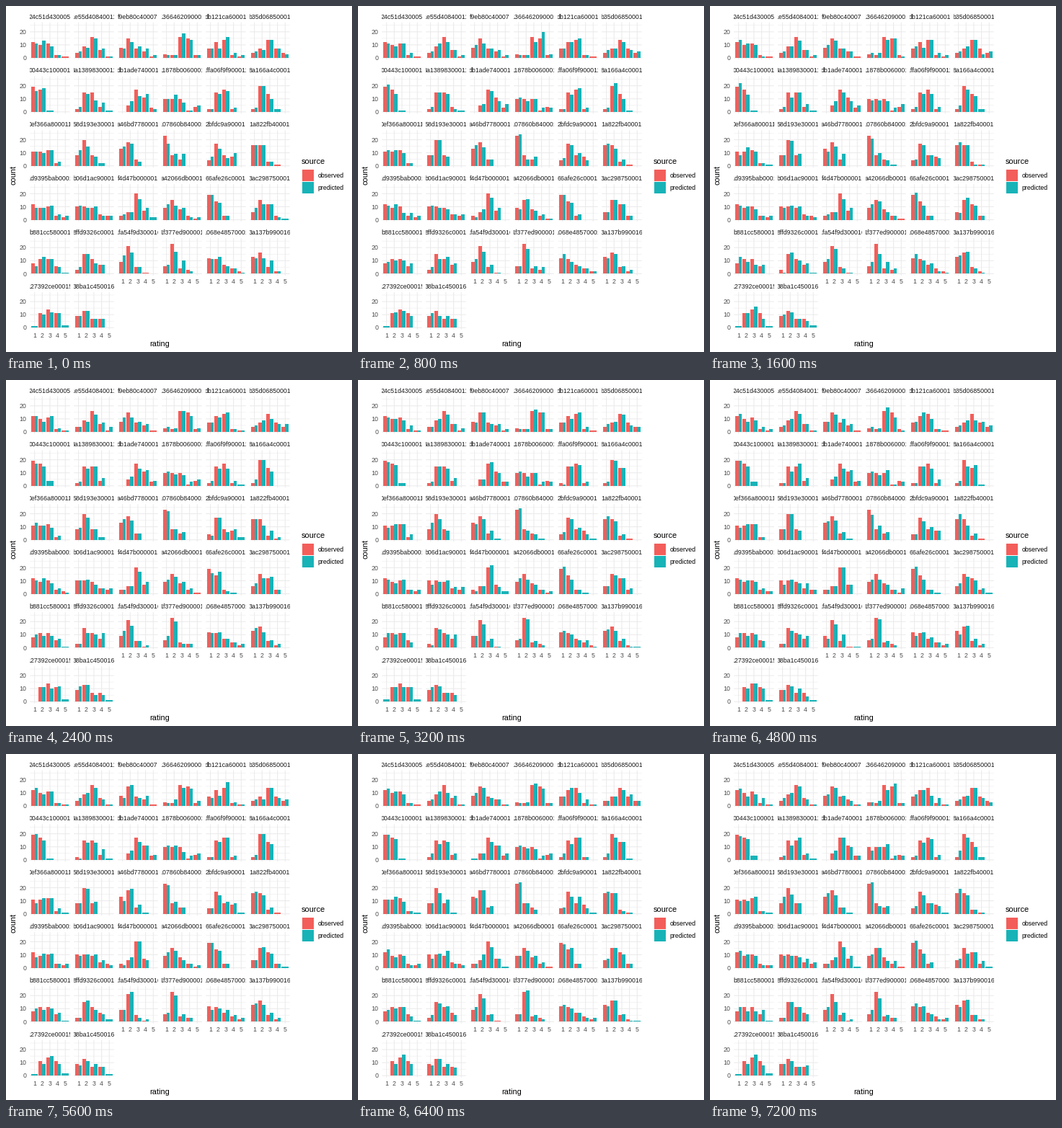
A matplotlib script that plays this animation: 480 px wide and 480 px high, repeating every 8000 ms.

```python
import matplotlib.pyplot as plt
import numpy as np
from matplotlib.animation import FuncAnimation
from matplotlib.patches import Rectangle
from matplotlib.transforms import Bbox, TransformedBbox

SIZE, DPI = 480, 72
FRAMES, INTERVAL = 10, 800
RED, TEAL, GRID = "#F35E5A", "#17B3B7", "#EBEBEB"
TICK, STRIP = "#4D4D4D", "#1A1A1A"

COLS = 6
LEFT, COL_STEP, WIDTH = 33.2, 61.0, 55.5
ZERO, ROW_STEP, UNIT = 72.0, 74.85, 1.81
UP, DOWN = 49.4, 2.4          # panel extent above and below the zero line
STEP = WIDTH / 5.2            # distance between two ratings
BAR = 0.9 * STEP

# Strip text, wider than its panel and cut off there, and the observed counts
# for ratings 1, 2, ...; trailing zeros are left out.
PANELS = [
    ("24c51d430005", (12, 10, 11, 2, 1)),
    ("1e55d40840011", (4, 9, 16, 6, 1)),
    ("f9eb80c40007", (8, 15, 7, 5, 1)),
    ("1366462090001", (3, 2, 16, 15, 2)),
    ("db121ca60001", (7, 12, 14, 2, 1)),
    ("b35d06850001", (4, 7, 14, 7, 4)),
    ("00443c100001", (19, 17)),
    ("3a13898300011", (2, 15, 15, 4)),
    ("db1ade740001", (0, 5, 17, 11, 3)),
    ("11878b0060001", (10, 10, 10, 1, 4)),
    ("1ffa06f9f900011", (2, 15, 17, 2)),
    ("8a166a4c0001", (2, 20, 14)),
    ("0ef366a800011", (11, 11, 12, 2)),
    ("58d193e30001", (8, 20, 8)),
    ("a46bd7780001", (13, 18, 5)),
    ("107860b840001", (23, 8, 5)),
    ("2bfdc9a90001", (4, 17, 8, 7)),
    ("1a822fb40001", (16, 16, 3, 1)),
    ("1d9395bab0001", (12, 9, 10, 3, 2)),
    ("b06d1ac90001", (10, 10, 9, 4, 3)),
    ("f4d47b000001", (3, 6, 20, 7)),
    ("a42066db0001", (9, 15, 8, 3, 1)),
    ("66afe26c0001", (19, 14, 3)),
    ("3ac298750001", (6, 15, 12, 3)),
    ("b881cc580001", (8, 11, 11, 6)),
    ("8ffd9326c0001", (3, 15, 11, 7)),
    ("1fa54f9d300016", (9, 21, 5, 1)),
    ("1f377ed900001", (6, 23, 4, 3)),
    ("1068e48570001", (12, 11, 7, 4, 2)),
    ("3a137b990016", (13, 16, 5, 2)),
    ("127392ce00015", (0, 11, 14, 11)),
    ("38ba1c450016", (9, 13, 7, 7)),
]

plt.rcParams["font.family"] = "Liberation Sans"
fig = plt.figure(figsize=(SIZE / DPI, SIZE / DPI), dpi=DPI, facecolor="white")
ax = fig.add_axes([0, 0, 1, 1])
ax.set_xlim(0, SIZE)
ax.set_ylim(SIZE, 0)
ax.axis("off")


def label(x, y, text, size=8.8, color="black", ha="left", **kw):
    return ax.text(x, y, text, fontsize=size, color=color, ha=ha, **kw)


def rect(x, y, w, h, color):
    return ax.add_patch(Rectangle((x, y), w, h, facecolor=color, linewidth=0, zorder=3))


def line(xs, ys, width):
    ax.plot(xs, ys, color=GRID, lw=width, solid_capstyle="butt", snap=False, zorder=1)


def corner(index):
    row, col = divmod(index, COLS)
    return LEFT + col * COL_STEP, ZERO + row * ROW_STEP


def rating_x(x, rating):
    return x + (rating - 0.4) * STEP


def draw_panel(index, name):
    x, zero = corner(index)
    top, bottom = zero - UP, zero + DOWN
    for value in range(0, 26, 5):
        y = zero - value * UNIT
        line((x, x + WIDTH), (y, y), 0.53 if value % 10 else 1.07)
    for rating in range(1, 6):
        mid = rating_x(x, rating)
        line((mid, mid), (top, bottom), 1.07)
        if index + COLS >= len(PANELS):
            label(mid, bottom + 11.2, rating, color=TICK, ha="center")
    if index % COLS == 0:
        for value in (0, 10, 20):
            label(28.3, zero - value * UNIT + 3.2, value, color=TICK, ha="right")
    strip = label(x + WIDTH / 2, top - 5, name, color=STRIP, ha="center")
    box = Bbox.from_extents(x, top - 17, x + WIDTH, top)
    strip.set_clip_box(TransformedBbox(box, ax.transData))
    strip.set_clip_on(True)


def predict(counts, rng):
    """One set of predicted counts per frame, scattered around the smoothed counts."""
    near = np.pad(counts, 1, mode="edge")
    mean = 0.8 * counts + 0.1 * (near[:-2] + near[2:])
    total = int(counts.sum())
    mean *= total / mean.sum()
    draws = rng.multinomial(total, mean / total, size=FRAMES)
    return np.clip(np.rint(mean + 0.65 * (draws - mean)), 0, 25)


rng = np.random.default_rng(12)
observed, predicted, bars = [], [], []
for i, (name, counts) in enumerate(PANELS):
    draw_panel(i, name)
    full = np.array(counts + (0,) * (5 - len(counts)))
    observed.append(full)
    predicted.append(predict(full, rng))
    bars.append([(rect(0, 0, 0, 0, RED), rect(0, 0, 0, 0, TEAL)) for _ in range(5)])

label(213, 472.4, "rating", 11, ha="center")
label(11, 235, "count", 11, ha="center", va="center", rotation=90)
label(410, 219, "source", 11)
for y, color, text in ((227, RED, "observed"), (244, TEAL, "predicted")):
    rect(411, y, 16, 16, color)
    label(432.6, y + 11, text)


def update(frame):
    for i, pairs in enumerate(bars):
        x, zero = corner(i)
        for r, (red, teal) in enumerate(pairs):
            obs, pred = observed[i][r], predicted[i][frame][r]
            # A lone bar takes the full width of its rating.
            width = BAR / 2 if obs and pred else BAR
            start = rating_x(x, r + 1) - BAR / 2
            red.set_bounds(start, zero, width, -obs * UNIT)
            teal.set_bounds(start + BAR - width, zero, width, -pred * UNIT)
            red.set_visible(obs > 0)
            teal.set_visible(pred > 0)
    return []


anim = FuncAnimation(fig, update, frames=FRAMES, interval=INTERVAL, repeat=True,
                     repeat_delay=0, blit=False)
plt.show()
```
